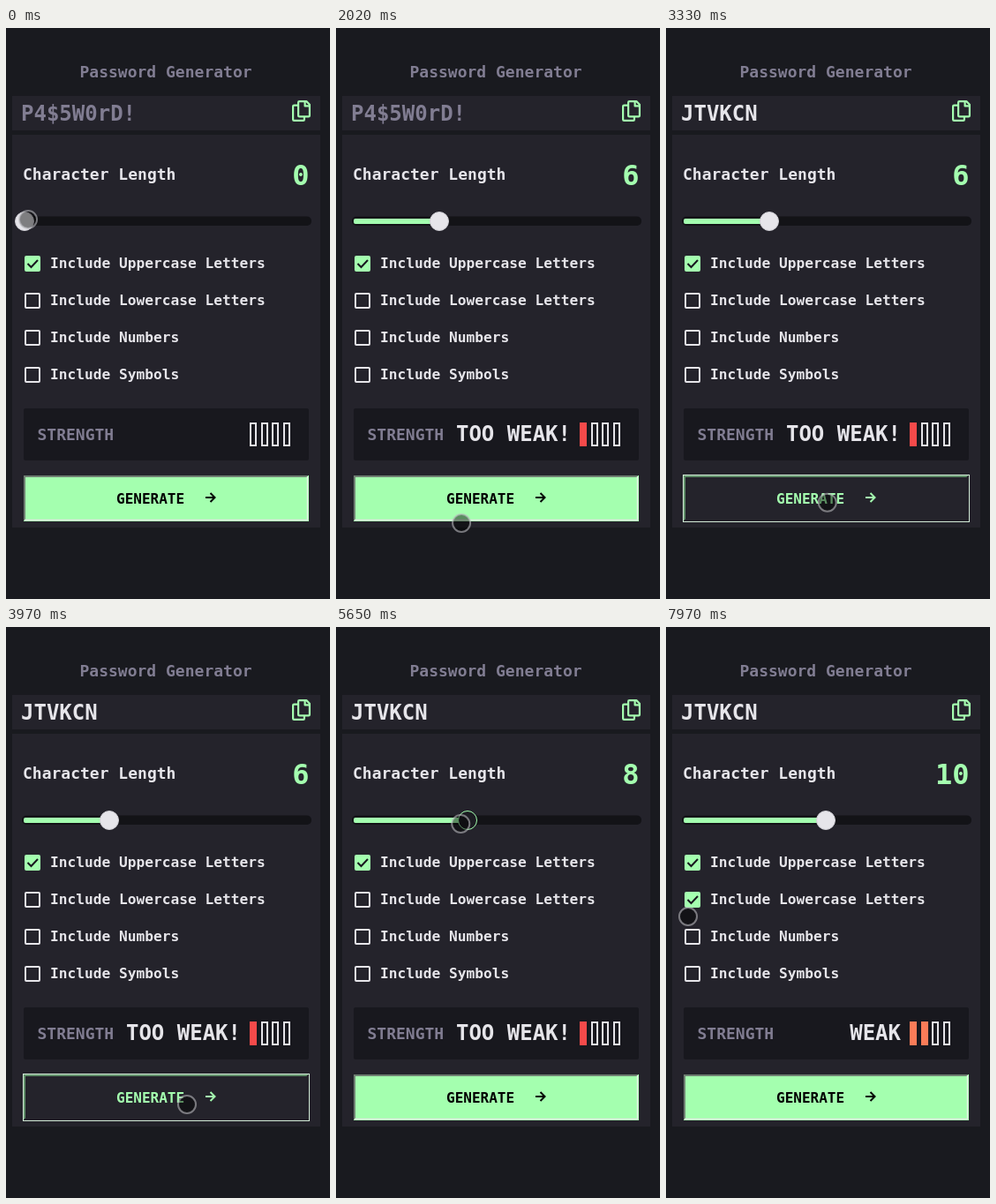
An HTML page that plays this animation: 367 px wide and 647 px high, repeating every 8 s.

```html
<!DOCTYPE html>
<html lang="en">
<head>
<meta charset="utf-8">
<title>Password Generator</title>
<style>
  html, body { margin: 0; width: 100%; height: 100%; overflow: hidden; background: #191a1f; }
  svg { display: block; width: 100%; height: 100%; }
  text { font: bold 18px "DejaVu Sans Mono", "Noto Sans Mono", monospace; fill: #e6e5ea; }
  .muted { fill: #817d92; }
  .label { font-size: 16.2px; }
  .big { font-size: 24px; }
  .green { fill: #a4ffaf; }
  .line { fill: none; stroke-width: 2; }
</style>
</head>
<body>
<svg viewBox="0 0 367 647" xmlns="http://www.w3.org/2000/svg">
  <rect width="367" height="647" fill="#191a1f"/>
  <text class="muted" x="83.5" y="56">Password Generator</text>

  <rect x="7" y="77" width="349" height="39" fill="#24232b"/>
  <text id="password" class="big" x="17" y="105"></text>
  <g transform="translate(324 82)" fill="none" stroke="#a4ffaf" stroke-width="2.2" stroke-linejoin="round">
    <path d="M7.1 2.3Q7.1 1.1 8.3 1.1H16.3L19.9 4.7V17.2Q19.9 18.4 18.7 18.4H8.3Q7.1 18.4 7.1 17.2Z"/>
    <path d="M14.6 1.1V6.4H19.9M7 5.6H2.3Q1.1 5.6 1.1 6.8V21.7Q1.1 22.9 2.3 22.9H12.7Q13.9 22.9 13.9 21.7V18.4"/>
  </g>

  <rect x="7" y="121" width="349" height="445" fill="#24232b"/>
  <text x="19" y="172">Character Length</text>
  <text id="count" class="green" x="343.6" y="177.5" text-anchor="end" style="font-size:32px"></text>

  <rect x="18" y="213.5" width="328" height="10.5" rx="5" fill="#131317"/>
  <rect id="fill" x="20" y="216" height="6" rx="2" fill="#a4ffaf"/>
  <circle id="thumb" cy="219" r="10.5"/>

  <g id="options"></g>

  <rect x="20" y="431" width="323" height="59" rx="2" fill="#18181e"/>
  <text class="muted" x="35.5" y="467">STRENGTH</text>
  <text id="strength" class="big" x="266" y="468" text-anchor="end"></text>
  <g id="bars"></g>

  <rect id="ring" class="line" x="19.5" y="506.5" width="324" height="53" stroke="#d3ecd8" style="stroke-width:1"/>
  <rect id="button" x="20" y="507" width="323" height="52"/>
  <path id="edgeDark" class="line" d="M21 558V508H342"/>
  <path id="edgeLight" class="line" d="M21 557.5H341.5V508" style="stroke-width:1.5"/>
  <text id="action" x="125" y="539" style="font-size:16px">GENERATE</text>
  <path id="arrow" class="line" d="M226 532H236.5M231.5 527l5 5-5 5"/>

  <circle id="cursor" r="10" fill="#000" fill-opacity=".45" stroke="#b9b9be" stroke-opacity=".6" stroke-width="2"/>
</svg>
<script>
const LOOP = 8000;
const GREEN = '#a4ffaf', PANEL = '#24232b', WHITE = '#e6e5ea';
const FOCUS = 2490, REFRESH = 3300, GRAB = 5180, TICK = 7600;

// pointer: time, x, y
const path = [
  [0, 25, 217], [60, 25, 217], [860, 101, 222], [920, 102, 222], [1200, 112, 224], [1670, 112, 224],
  [2020, 142, 561], [2310, 165, 535], [3030, 165, 535], [3680, 205, 541], [3970, 205, 541],
  [4250, 95, 430], [4450, 48, 320], [4600, 92, 250], [4710, 118, 231], [4830, 118, 231],
  [4890, 121, 226], [5180, 121, 226], [5650, 141.2, 223], [5940, 157.2, 222], [6470, 174, 220],
  [6770, 174, 220], [7150, 18, 292], [7400, 28, 312], [7640, 28, 312], [7960, 25, 328], [8000, 25, 328]
];

const $ = id => document.getElementById(id);
const set = (el, attrs) => { for (const k in attrs) el.setAttribute(k, attrs[k]); };
const clamp = v => Math.min(1, Math.max(0, v));

function add(parent, tag, attrs, text = '') {
  const el = document.createElementNS('http://www.w3.org/2000/svg', tag);
  set(el, attrs);
  el.textContent = text;
  return parent.appendChild(el);
}

const boxes = ['Uppercase Letters', 'Lowercase Letters', 'Numbers', 'Symbols'].map((name, i) => {
  const y = 258 + 42 * i;
  const box = add($('options'), 'rect', { x: 22, y: y + 1, width: 16, height: 16, rx: 1, 'stroke-width': 2 });
  const tick = add($('options'), 'path', { class: 'line', d: `M24.5 ${y + 9}l4 4 7.5-8`, stroke: '#18171f' });
  add($('options'), 'text', { class: 'label', x: 50, y: y + 14 }, 'Include ' + name);
  return { box, tick };
});

const bars = [0, 1, 2, 3].map(i => add($('bars'), 'rect', {
  x: Math.round(276 + 12.6 * i) + 1, y: 448, width: 6, height: 25, 'stroke-width': 2
}));

// monotone cubic through the path points
function slope(i, axis) {
  const a = path[i - 1], b = path[i], c = path[i + 1];
  if (!a || !c) return 0;
  const left = (b[axis] - a[axis]) / (b[0] - a[0]);
  const right = (c[axis] - b[axis]) / (c[0] - b[0]);
  return left * right > 0 ? 2 * left * right / (left + right) : 0;
}

function pointer(t, axis) {
  let i = 0;
  while (i < path.length - 2 && t >= path[i + 1][0]) i++;
  const a = path[i], b = path[i + 1], h = b[0] - a[0];
  const u = (t - a[0]) / h, v = 1 - u;
  return a[axis] * (1 + 2 * u) * v * v + b[axis] * u * u * (3 - 2 * u)
    + h * u * v * (slope(i, axis) * v - slope(i + 1, axis) * u);
}

const rgb = hex => [1, 3, 5].map(i => parseInt(hex.slice(i, i + 2), 16));
function blend(p, ...stops) {
  const n = stops.length - 1, i = Math.min(n - 1, Math.floor(p * n)), u = p * n - i;
  const a = rgb(stops[i]), b = rgb(stops[i + 1]);
  return `rgb(${a.map((v, k) => Math.round(v + (b[k] - v) * u))})`;
}

function lengthAt(t, x) {
  if (t >= 1300 && t < GRAB) return 6;
  if (t >= 6480) return 10;
  return Math.round((x - 21) / 16);
}

function draw(t) {
  const x = pointer(t, 1), y = pointer(t, 2);
  const length = lengthAt(t, x), thumbX = 21 + 16 * length;
  const held = t >= GRAB && t < TICK;
  const lower = t >= TICK;

  set($('cursor'), { cx: x, cy: y });
  $('count').textContent = length;
  set($('fill'), { width: thumbX - 20 });
  set($('thumb'), { cx: thumbX, fill: held ? '#1c1c22' : WHITE, stroke: held ? GREEN : '#cfced4' });

  $('password').textContent = t < FOCUS ? 'P4$5W0rD!' : t < REFRESH ? 'DKGRXB' : 'JTVKCN';
  $('password').classList.toggle('muted', t < FOCUS);

  boxes.forEach(({ box, tick }, i) => {
    const on = i === 0 || (i === 1 && lower);
    set(box, { fill: on ? GREEN : 'none', stroke: on ? GREEN : WHITE });
    set(tick, { visibility: on ? 'visible' : 'hidden' });
  });

  $('strength').textContent = lower ? 'WEAK' : length ? 'TOO WEAK!' : '';
  const level = lower ? 2 : length > 5 ? 1 : 0;
  const tone = lower ? '#fb7c58' : '#f64a4a';
  bars.forEach((bar, i) => set(bar, { fill: i < level ? tone : 'none', stroke: i < level ? tone : WHITE }));

  const p = t < GRAB ? clamp((t - FOCUS) / 240) : 1 - clamp((t - GRAB) / 240);
  const ink = blend(p, '#000000', '#6cb584', GREEN);
  set($('ring'), { visibility: t >= FOCUS && t < GRAB ? 'visible' : 'hidden' });
  set($('button'), { fill: blend(p, GREEN, '#416d68', PANEL) });
  set($('edgeDark'), { stroke: blend(p, '#6f7f72', '#5c8a78', '#63936c') });
  set($('edgeLight'), { stroke: blend(p, '#e2efe4', '#8fb0ac', PANEL) });
  $('action').style.fill = ink;
  set($('arrow'), { stroke: ink });
}

function loop() {
  draw(performance.now() % LOOP);
  requestAnimationFrame(loop);
}
loop();
</script>
</body>
</html>
```
